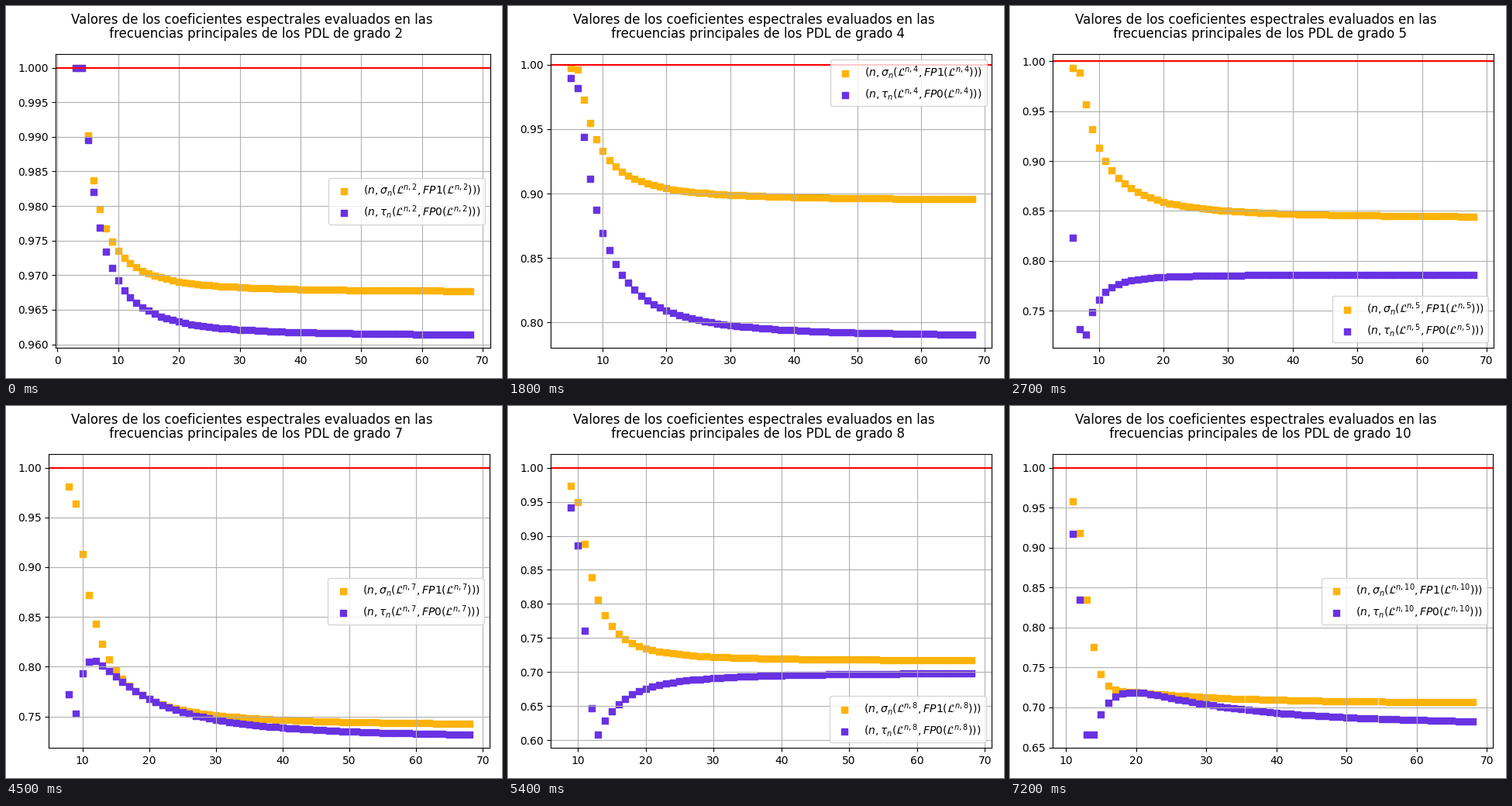
Animation, 640 px wide and 480 px high, one loop 8 s. Source, as a matplotlib script:

```python
import numpy as np
import matplotlib.pyplot as plt
from matplotlib.animation import FuncAnimation

MAX_N = 68
FIRST_DEGREE, LAST_DEGREE = 2, 10
STEP_MS = 100
STEPS_PER_DEGREE = 9
TOTAL_STEPS = 80
MARGINS = dict(left=0.125, right=0.9, bottom=0.11, top=0.88)
AXES_TOP = 0.87


def discrete_legendre(n, degree):
    """Unit discrete Legendre polynomial with n samples."""
    grid = np.linspace(-1, 1, n)
    q, _ = np.linalg.qr(np.polynomial.legendre.legvander(grid, degree))
    return q[:, degree]


def best_coefficient(poly, degree, freqs):
    """Largest cosine between poly and a sinusoid of the same parity."""
    n = len(poly)
    u = np.arange(n) - (n - 1) / 2
    wave = np.sin if degree % 2 else np.cos
    waves = wave(2 * np.pi / n * np.outer(freqs, u))
    norms = np.linalg.norm(waves, axis=1)
    ok = norms > 1e-9
    return np.max(np.abs(waves[ok] @ poly) / norms[ok])


def coefficients(degree):
    ns = np.arange(degree + 1, MAX_N + 1)
    sigma, tau = [], []
    for n in ns:
        poly = discrete_legendre(n, degree)
        fine = np.linspace(0.3, min(n / 2, degree), 1500, endpoint=False)
        whole = np.arange(1, n // 2 + 1)
        tau.append(best_coefficient(poly, degree, whole))
        sigma.append(max(best_coefficient(poly, degree, fine), tau[-1]))
    return ns, sigma, tau


def label(symbol, freq, degree):
    poly = r"\mathcal{L}^{n, %d}" % degree
    return rf"$(n, \{symbol}_n({poly}, {freq}({poly})))$"


def draw(degree):
    ns, sigma, tau = data[degree]
    fig.clear()
    fig.subplots_adjust(**MARGINS)
    ax = fig.add_subplot()
    ax.scatter(ns, sigma, marker="s", color="#feb308",
               label=label("sigma", "FP1", degree))
    ax.scatter(ns, tau, marker="s", color="#6832e3",
               label=label("tau", "FP0", degree))
    ax.axhline(1, color="red")
    ax.grid()
    ax.legend()
    # the spaces around the line break shift the two centred lines
    fig.suptitle("Valores de los coeficientes espectrales evaluados en las \n"
                 f" frecuencias principales de los PDL de grado {degree}",
                 y=0.982, linespacing=1.03)
    fig.tight_layout()
    fig.subplots_adjust(top=AXES_TOP)


def update(step):
    degree = FIRST_DEGREE + step // STEPS_PER_DEGREE
    if shown["degree"] != degree:
        shown["degree"] = degree
        draw(degree)
    return []


data = {d: coefficients(d) for d in range(FIRST_DEGREE, LAST_DEGREE + 1)}
shown = {"degree": None}
fig = plt.figure(figsize=(6.4, 4.8), dpi=100)
anim = FuncAnimation(fig, update, frames=TOTAL_STEPS, interval=STEP_MS,
                     repeat=True, repeat_delay=0, blit=False)
plt.show()
```
